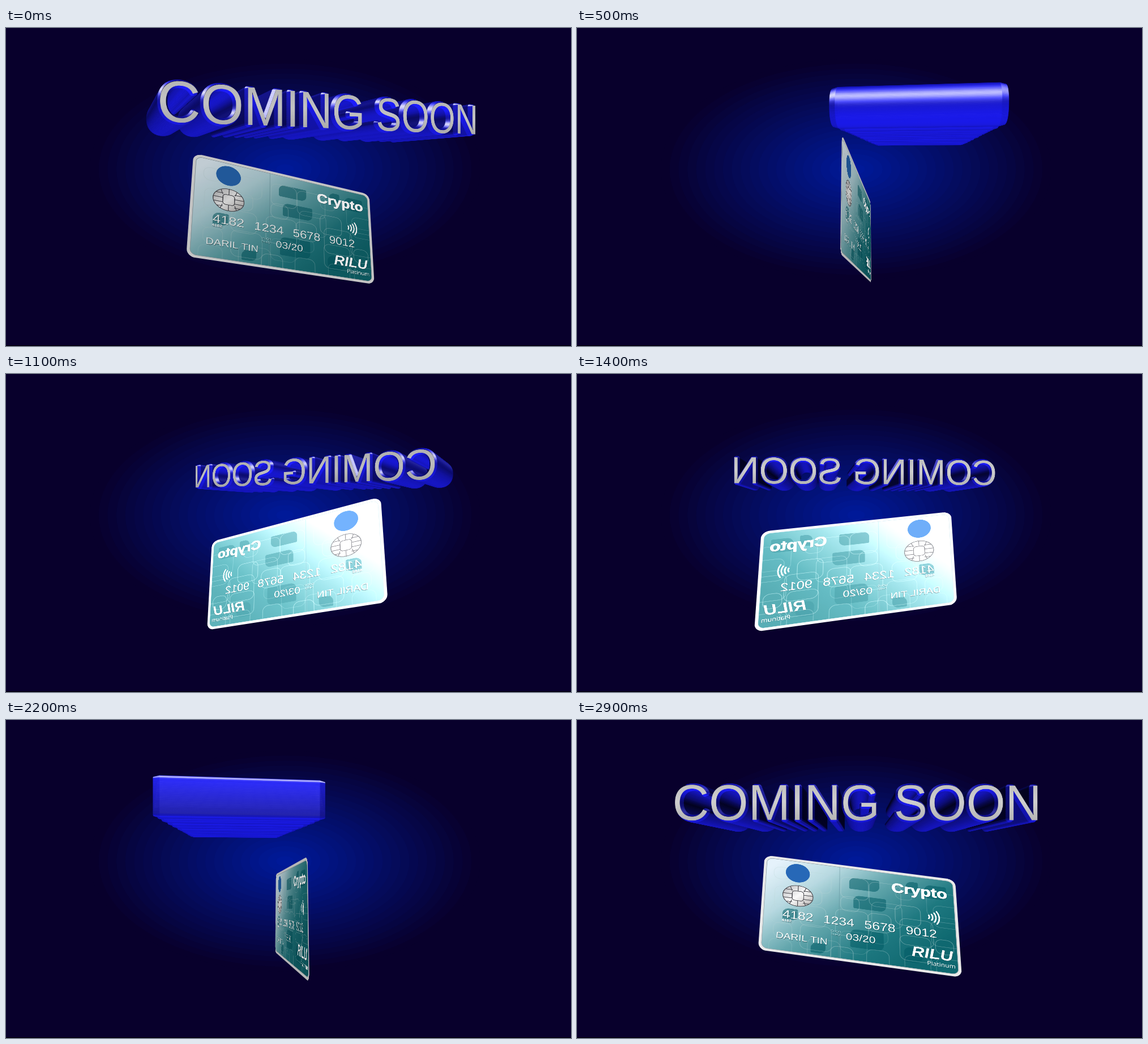
Write an HTML page with a canvas that moves like this. It is 998 px wide and 561 px high and loops after 3100 ms.

```html
<!DOCTYPE html>
<html lang="en">
<head>
<meta charset="utf-8">
<title>Coming soon</title>
<style>
  html, body { margin: 0; width: 100%; height: 100%; overflow: hidden; background: #08002c; }
  #stage { position: relative; width: 998px; height: 561px; overflow: hidden; }
  canvas { position: absolute; left: 0; top: 0; transform-origin: 0 0; }
</style>
</head>
<body>
<div id="stage"></div>
<script>
const STEP = 100, FRAMES = 30, LOOP = 3100, TURN = 2 * Math.PI / 31;
const START_ANGLE = 23.6 * Math.PI / 180;
const TITLE_EYE = 700, CARD_EYE = 770;              // viewing distances
const SANS = '"Liberation Sans", Arial, sans-serif';
const stage = document.getElementById('stage');

function makeCanvas(w, h, parent) {
  const c = document.createElement('canvas');
  c.width = w;
  c.height = h;
  if (parent) parent.append(c);
  return c.getContext('2d', { willReadFrequently: !parent });
}

const backdrop = makeCanvas(998, 561, stage);
const solid = makeCanvas(998, 561, stage);

function paintBackdrop(g) {
  g.fillStyle = '#08002c';
  g.fillRect(0, 0, 998, 561);
  const bands = 22;
  for (let i = 0; i < bands; i++) {
    const p = i / (bands - 1), r = 1 - i / bands;
    g.fillStyle = `rgb(${8 - 8 * p}, ${25 * p}, ${44 + 108 * p})`;
    g.beginPath();
    g.ellipse(493, 249, 345 * r, 195 * r, 0, 0, 7);
    g.fill();
  }
  g.fillStyle = '#000';
  g.fillRect(0, 560, 998, 1);
}

// ---- Card face ----
const CARD_W = 540, CARD_H = 340, CARD_RES = 1.4;

function rounded(g, x, y, w, h, r) {
  g.beginPath();
  g.roundRect(x, y, w, h, r);
}

function paintPattern(g) {
  let seed = 11;
  const rnd = () => (seed = (seed * 16807) % 2147483647) / 2147483647;
  g.fillStyle = 'rgba(0, 84, 94, .55)';
  const blocks = [[242, 42, 84, 42], [254, 106, 90, 46], [60, 184, 42, 40],
    [246, 226, 90, 62], [400, 30, 34, 40], [452, 34, 60, 48], [390, 262, 48, 50], [140, 290, 40, 34]];
  for (const [x, y, w, h] of blocks) {
    rounded(g, x, y, w, h, [18, 4, 18, 4]);
    g.fill();
  }
  g.lineWidth = 2;
  for (let col = 0; col < 6; col++) {
    for (let row = 0; row < 5; row++) {
      const size = 44 + rnd() * 46;
      g.strokeStyle = `rgba(170, 195, 195, ${.15 + rnd() * .25})`;
      rounded(g, 22 + col * 86 + rnd() * 26, 36 + row * 60 + rnd() * 24, size, size, 18);
      g.stroke();
    }
  }
  g.strokeStyle = 'rgba(90, 130, 140, .4)';
  g.beginPath();
  g.moveTo(215, 10);
  g.lineTo(215, 330);
  g.stroke();
}

function paintChip(g, x, y) {
  const metal = g.createLinearGradient(x - 40, y - 36, x + 40, y + 36);
  metal.addColorStop(0, '#a9a9ab');
  metal.addColorStop(.5, '#e6e6e6');
  metal.addColorStop(1, '#a39f9d');
  g.save();
  g.beginPath();
  g.ellipse(x, y, 42, 37, 0, 0, 7);
  g.fillStyle = metal;
  g.fill();
  g.strokeStyle = '#4b4b50';
  g.lineWidth = 2;
  g.stroke();
  g.clip();
  g.beginPath();
  for (const dy of [-20, -5, 10, 24]) {
    g.moveTo(x - 42, y + dy);
    g.lineTo(x - 15, y + dy);
    g.moveTo(x + 15, y + dy);
    g.lineTo(x + 42, y + dy);
  }
  for (const dx of [-24, 0, 24]) {
    g.moveTo(x + dx, y - 37);
    g.lineTo(x + dx * .7, y - 17);
    g.moveTo(x + dx, y + 37);
    g.lineTo(x + dx * .7, y + 17);
  }
  g.stroke();
  rounded(g, x - 16, y - 17, 32, 34, 8);
  g.stroke();
  g.restore();
}

function paintCard(g) {
  g.scale(CARD_RES, CARD_RES);
  rounded(g, 0, 0, CARD_W, CARD_H, 24);
  g.fillStyle = '#d7d7d7';
  g.fill();
  g.save();
  rounded(g, 8, 9, CARD_W - 16, CARD_H - 18, 17);
  const tint = g.createLinearGradient(60, 0, 400, 330);
  tint.addColorStop(0, '#d3dfe7');
  tint.addColorStop(.25, '#a9c8cf');
  tint.addColorStop(.5, '#5a989e');
  tint.addColorStop(.78, '#1c6f76');
  tint.addColorStop(1, '#0e6067');
  g.fillStyle = tint;
  g.fill();
  g.clip();
  paintPattern(g);
  g.restore();
  rounded(g, 8, 9, CARD_W - 16, CARD_H - 18, 17);
  g.strokeStyle = '#8f9fa3';
  g.lineWidth = 1.5;
  g.stroke();

  g.fillStyle = '#2460a8';
  g.beginPath();
  g.arc(97, 52, 34, 0, 7);
  g.fill();
  paintChip(g, 100, 135);

  const write = (text, x, y, font, color = '#e4e8e8') => {
    g.font = font;
    g.fillStyle = 'rgba(20, 50, 55, .5)';
    g.fillText(text, x + 1, y + 1.5);
    g.fillStyle = color;
    g.fillText(text, x, y);
  };
  ['4182', '1234', '5678', '9012'].forEach((n, i) => write(n, 60 + i * 112, 218, `38px ${SANS}`));
  write('4182', 59, 231, `bold 12px ${SANS}`);
  write('GOOD', 193, 245, `9px ${SANS}`, '#a5cdd0');
  write('THRU', 193, 256, `9px ${SANS}`, '#a5cdd0');
  write('03/20', 234, 265, `32px ${SANS}`);
  write('DARIL TIN', 45, 291, `29px ${SANS}`);
  write('Crypto', 360, 76, `bold 48px ${SANS}`, '#fff');
  g.strokeStyle = '#fff';
  g.lineWidth = 1.5;
  g.strokeText('Crypto', 360, 76);
  write('RILU', 410, 290, `italic bold 47px ${SANS}`, '#fff');
  write('Platinum', 450, 313, '18px "Open Sans", sans-serif', '#fff');

  g.lineWidth = 4;
  g.lineCap = 'round';
  for (let i = 0; i < 4; i++) {
    g.beginPath();
    g.arc(450, 148, 12 + i * 9, -.5 - i * .03, .5 + i * .03);
    g.stroke();
  }
}

// ---- Solid lettering ----
const TITLE = 'COMING SOON', EM = 64, LEFT = -243.5, BASE = -46.5;
const FRONT = 196, BACK = -5, BEVEL = 7, BULGE = 2;
const CAP_RES = 2.5, CAP_BASE = 130;

function paintCap(g) {
  const shine = g.createLinearGradient(0, 10, 0, 135);
  shine.addColorStop(0, '#d8d8d8');
  shine.addColorStop(.5, '#eaeaea');
  shine.addColorStop(1, '#cccccc');
  g.fillStyle = shine;
  g.font = `${EM * CAP_RES}px ${SANS}`;
  g.fillText(TITLE, 0, CAP_BASE);
}

// Marching squares over softened text gives wall segments with the inside on their right.
function traceTitle() {
  const res = 2, w = 990, h = 130, pad = 10, base = 110, cell = 2;
  const g = makeCanvas(w, h);
  g.filter = 'blur(1.3px)';
  g.font = `${EM * res}px ${SANS}`;
  g.fillText(TITLE, pad, base);
  const data = g.getImageData(0, 0, w, h).data;
  const alpha = (x, y) => data[(y * w + x) * 4 + 3] - 127.5;
  const vertex = (x, y) => {
    const i = Math.round(x), j = Math.round(y);
    const gx = alpha(i - 2, j) - alpha(i + 2, j), gy = alpha(i, j - 2) - alpha(i, j + 2);
    const len = Math.hypot(gx, gy) || 1;
    return { u: LEFT + (x - pad) / res, v: BASE + (y - base) / res, nu: gx / len, nv: gy / len };
  };
  const walls = [];
  for (let y = 4; y < h - 6; y += cell) {
    for (let x = 4; x < w - 6; x += cell) {
      const corners = [[x, y], [x + cell, y], [x + cell, y + cell], [x, y + cell]];
      const val = corners.map(c => alpha(c[0], c[1]));
      const exits = [], entries = [];
      for (let i = 0; i < 4; i++) {
        const j = (i + 1) % 4;
        if (val[i] > 0 === val[j] > 0) continue;
        const p = val[i] / (val[i] - val[j]), a = corners[i], b = corners[j];
        (val[i] > 0 ? exits : entries).push(vertex(a[0] + (b[0] - a[0]) * p, a[1] + (b[1] - a[1]) * p));
      }
      exits.forEach((a, i) => walls.push({ a, b: entries[i] }));
    }
  }
  return walls;
}

const RINGS = [
  { hi: FRONT, lo: FRONT - BEVEL, outHi: 0, outLo: BULGE, lean: 1 },
  { hi: FRONT - BEVEL, lo: BACK + BEVEL, outHi: BULGE, outLo: BULGE, lean: 0 },
  { hi: BACK + BEVEL, lo: BACK, outHi: BULGE, outLo: 0, lean: -1 }
];

// One highlight from above the eye, one from either side; walls darken downwards.
function shade({ a, b }, lean, cos, sin) {
  const nu = a.nu + b.nu, nv = a.nv + b.nv;
  const len = Math.hypot(nu, nv, lean) || 1;
  const x = (nu * cos + lean * sin) / len, y = nv / len, z = (lean * cos - nu * sin) / len;
  const pos = n => Math.max(0, n);
  const drop = (a.v - BASE) / 44 + 1;
  const k = .13 + pos(z) * (.82 - .35 * drop) + .6 * pos(y) + .25 * pos(-y);
  const s = pos(.917 * z - .4 * y) ** 24 + pos(.53 * Math.abs(x) - .45 * y + .72 * z) ** 30;
  const rg = Math.min(255, 30 * k + 190 * s);
  return `rgb(${rg}, ${rg}, ${Math.min(255, 255 * k + 150 * s)})`;
}

function titlePoint(u, v, n, cos, sin) {
  const w = 1 - (n * cos - u * sin) / TITLE_EYE;
  return [506 * w + u * cos + n * sin, 241 * w + v, w];
}

function drawWalls(g, walls, cos, sin) {
  g.clearRect(0, 0, 998, 561);
  const eye = -TITLE_EYE * sin;
  for (const s of walls) s.far = Math.hypot((s.a.u + s.b.u) / 2 - eye, (s.a.v + s.b.v) / 2);
  walls.sort((p, q) => q.far - p.far);
  const rings = cos > 0 ? [...RINGS].reverse() : RINGS;
  const place = (p, out, n) => {
    const [x, y, w] = titlePoint(p.u + p.nu * out, p.v + p.nv * out, n, cos, sin);
    return [x / w, y / w];
  };
  g.lineWidth = .7;
  for (const wall of walls) {
    const { a, b } = wall;
    for (const r of rings) {
      const quad = [place(a, r.outHi, r.hi), place(b, r.outHi, r.hi),
        place(b, r.outLo, r.lo), place(a, r.outLo, r.lo)];
      const [p, q, s, t] = quad;
      if ((s[0] - p[0]) * (t[1] - q[1]) - (s[1] - p[1]) * (t[0] - q[0]) >= 0) continue;
      g.fillStyle = g.strokeStyle = shade(wall, r.lean, cos, sin);
      g.beginPath();
      quad.forEach(c => g.lineTo(c[0], c[1]));
      g.closePath();
      g.fill();
      g.stroke();
    }
  }
}

// ---- Placing flat layers in space ----
function cardPoint(x, y, cos, sin) {
  const u = (x / CARD_W - .5) * 348;
  const q = (y / CARD_H - .5) * 171 + .133 * u;
  const w = 1 + u * sin / CARD_EYE - .0004 * q;
  return [498.5 * w + u * cos, 428 * w + 1.028 * q - 86, w];
}

// `point` is linear in x and y and returns homogeneous screen coordinates.
function project(el, point) {
  const o = point(0, 0);
  const dx = point(1, 0).map((n, i) => n - o[i]);
  const dy = point(0, 1).map((n, i) => n - o[i]);
  const column = c => [c[0], c[1], 0, c[2]];
  const m = [...column(dx), ...column(dy), 0, 0, 1, 0, ...column(o)];
  el.style.transform = `matrix3d(${m.map(n => n.toFixed(9)).join()})`;
}

const cap = makeCanvas(1200, 170, stage);
const card = makeCanvas(CARD_W * CARD_RES, CARD_H * CARD_RES, stage);
paintBackdrop(backdrop);
paintCap(cap);
paintCard(card);
const walls = traceTitle();

// The back catches a strong glare that washes the colours out, the front a weak one.
function cardLight(angle) {
  const lobe = (deg, power) => Math.max(0, Math.cos(angle - deg * Math.PI / 180)) ** power;
  const glare = lobe(168, 6);
  const bright = .85 + 1.05 * glare + .27 * lobe(-10, 8);
  return `contrast(${(1 - .48 * glare).toFixed(3)}) brightness(${bright.toFixed(3)})`;
}

function render(step) {
  const angle = START_ANGLE + step * TURN;
  const cos = Math.cos(angle), sin = Math.sin(angle);
  drawWalls(solid, walls, cos, sin);

  const eyeDepth = TITLE_EYE * cos;
  const plane = eyeDepth > FRONT ? FRONT : BACK;
  cap.canvas.style.visibility = eyeDepth > FRONT || eyeDepth < BACK ? 'visible' : 'hidden';
  cap.canvas.style.filter = `brightness(${(.28 + .6 * Math.abs(cos)).toFixed(3)})`;
  project(cap.canvas, (x, y) =>
    titlePoint(LEFT + x / CAP_RES, BASE + (y - CAP_BASE) / CAP_RES, plane, cos, sin));

  card.canvas.style.filter = cardLight(angle);
  project(card.canvas, (x, y) => cardPoint(x / CARD_RES, y / CARD_RES, cos, sin));
}

const began = performance.now();
let shown = -1;
function tick() {
  const time = (performance.now() - began) % LOOP;
  const step = Math.min(FRAMES - 1, Math.floor(time / STEP));
  if (step !== shown) render(shown = step);
  requestAnimationFrame(tick);
}
tick();
</script>
</body>
</html>
```
